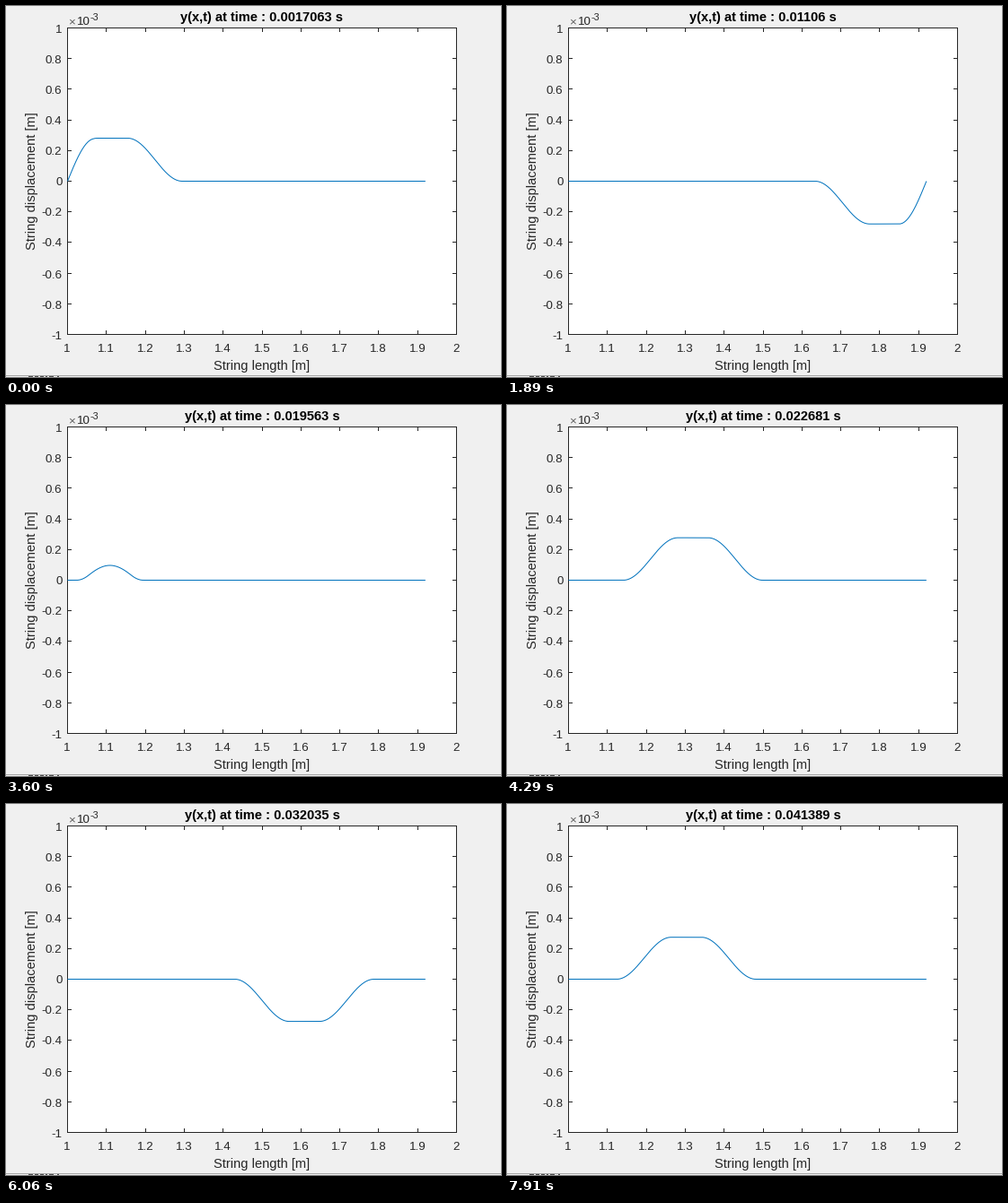
Recreate the animation shown at these times as a matplotlib script. Size 551 px wide and 414 px high, loop 7990 ms.

```python
import math

import numpy as np
import matplotlib.pyplot as plt
from matplotlib.animation import FuncAnimation

W, H, DPI = 551, 414, 64          # a power-of-two dpi keeps the pixel size exact
PX = 72 / DPI                     # one pixel in points
TICK, LOOP = 34, 7990             # ms per drawn frame, ms per loop

LEFT, RIGHT, TOP, BOTTOM = 68.5, 501.5, 24.5, 366.5
MID = (TOP + BOTTOM) / 2
INK, BLUE = "#262626", "#0072bd"

RATE = 176400                     # simulation steps per second
SPEED, LENGTH = 97.45, 0.92       # wave speed, string length
HALF, EDGE = 0.109, 0.14          # pulse half width, edge width

TIME = [0, 900, 1890, 3600, 4210, 4980, 5060, 5910, 6060, 6760, 7910]
SHOT = [0, 12, 25, 47, 55, 65, 66, 77, 79, 88, 103]
STEP = [0, 15, 33, 63, 73, 87, 88, 104, 107, 119, 140]

xs = np.linspace(0, LENGTH, 600)

plt.rcParams["font.family"] = "Liberation Sans"
plt.rcParams["path.snap"] = False  # half-pixel centres are already crisp
fig = plt.figure(figsize=(W / DPI, H / DPI), dpi=DPI, facecolor="#f0f0f0")
ax = fig.add_axes([0, 0, 1, 1])
ax.set_xlim(0, W)
ax.set_ylim(H, 0)
ax.axis("off")


def line(x, y, color=INK, z=2):
    return ax.plot(x, y, color=color, lw=PX, zorder=z,
                   solid_capstyle="butt")[0]


def label(x, y, s, size=13.33, ha="center", color=INK, **kw):
    return ax.text(x, y, s, fontsize=size * PX, ha=ha, va="baseline",
                   color=color, **kw)


def draw_axes():
    ax.fill([LEFT, RIGHT, RIGHT, LEFT], [TOP, TOP, BOTTOM, BOTTOM],
            color="white", lw=0, zorder=0)
    for x in (LEFT, RIGHT):
        line([x, x], [TOP - 0.5, BOTTOM + 0.5])
    for y in (TOP, BOTTOM):
        line([LEFT, RIGHT], [y, y])
    for i in range(11):
        # Ticks sit on whole pixels, as the box does.
        x = math.floor(LEFT + i * (RIGHT - LEFT) / 10) + 0.5
        y = math.floor(BOTTOM - i * (BOTTOM - TOP) / 10) + 0.5
        line([x, x], [BOTTOM, BOTTOM - 4.5])
        line([x, x], [TOP, TOP + 4.5])
        line([LEFT, LEFT + 4.5], [y, y])
        line([RIGHT, RIGHT - 4.5], [y, y])
        label(x - 0.5, 386, f"{1 + i / 10:g}")
        label(62.5, y + 5, f"{(i - 5) / 5:g}", ha="right")
    label(69, 21, "\u00d7", ha="left", color="#606060")
    label(78.5, 21, "10", ha="left")
    label(93.5, 15.5, "-3", size=10.7, ha="left")
    label(285, 406, "String length [m]", size=14.67)
    label(33, MID, "String displacement [m]", size=14.67,
          rotation=90, rotation_mode="anchor")


def draw_window_edge():
    line([0, W], [412.5, 412.5], color="#a6a6a6")
    for x, w in ((25, 5), (32, 4), (38, 4), (44, 2), (48, 5), (57, 2)):
        line([x, x + w], [413.5, 413.5], color="#505050")


def pulse(d):
    """Flat top with raised-cosine edges."""
    u = np.clip((HALF - np.abs(d)) / EDGE + 0.5, 0, 1)
    return (1 - np.cos(np.pi * u)) / 2


def displacement(t):
    """Travelling pulse that flips at both fixed ends."""
    travel = 0.530 + SPEED * (t - 1051 / RATE)
    c = travel % (2 * LENGTH)
    y = np.zeros_like(xs)
    for k in (-1, 0, 1):
        shift = 2 * LENGTH * k
        y += pulse(xs - c - shift) - pulse(xs + c - shift)
    return 0.281 * math.exp(-0.63 * t) * y


draw_axes()
draw_window_edge()
title = label(285, 17, "", size=14.67, color="black", weight="bold")
wave = line([], [], color=BLUE, z=3)


def update(i):
    shot = int(np.interp((i + 1) * TICK - 1, TIME, SHOT))
    n = int(np.interp(shot, SHOT, STEP) + 0.5)
    t = (301 + 50 * n) / RATE
    wave.set_data(LEFT + xs * (RIGHT - LEFT),
                  MID - displacement(t) * (BOTTOM - TOP) / 2)
    title.set_text(f"y(x,t) at time : {t:.5g} s")
    return wave, title


anim = FuncAnimation(fig, update, frames=LOOP // TICK, interval=TICK,
                     repeat=True, repeat_delay=0)
plt.show()
```
